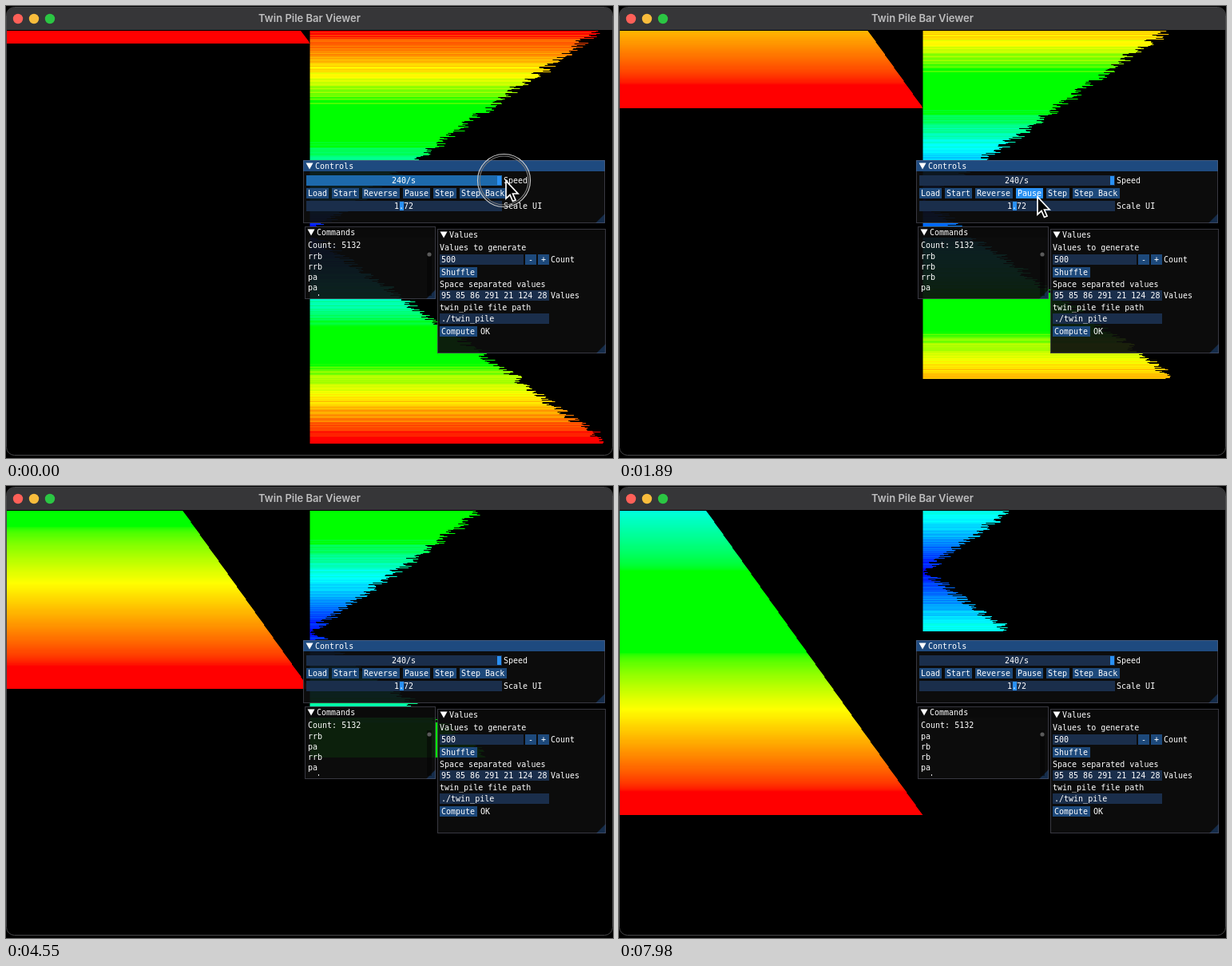
Animation, 760 px wide and 566 px high, one loop 8 s. Source, as an HTML page with a canvas:

```html
<!DOCTYPE html>
<html lang="en">
<head>
<meta charset="utf-8">
<title>Twin Pile Bar Viewer</title>
<style>
  html, body { margin: 0; width: 100%; height: 100%; overflow: hidden; background: #000; }
  canvas { display: block; }
</style>
</head>
<body>
<canvas width="760" height="566"></canvas>
<script>
const ctx = document.querySelector('canvas').getContext('2d');
const LOOP = 8000, STEP = 70;
const SIZE = 500, JITTER = 26, TOP = 30.6, ROW = 533 / SIZE, UNIT = 379 / SIZE;
const MONO = "10px 'DejaVu Sans Mono', monospace";
const FRAME = '#1a2e4b', HOVER_FRAME = '#1b4470', ACTIVE = '#1d69ab';
const BUTTON = '#1d497b', BRIGHT = '#2990f3';

// [ms, value...] keys
const sortedKeys = [[0, 15], [1190, 63], [2660, 122], [4550, 210], [5950, 273], [6860, 312], [7980, 358]];
const cursorKeys = [[0, 626, 219], [280, 626, 219], [1050, 532, 259], [1260, 532, 259],
  [1750, 524, 239], [3430, 524, 239], [4060, 560, 575]];

const clamp = v => Math.min(1, Math.max(0, v));
const smooth = u => u * u * (3 - 2 * u);
function sample(keys, t, ease = u => u) {
  const i = keys.findIndex(k => k[0] > t);
  if (i < 0) return keys[keys.length - 1].slice(1);
  const a = keys[i - 1], b = keys[i], u = ease((t - a[0]) / (b[0] - a[0]));
  return a.slice(1).map((v, j) => v + (b[j + 1] - v) * u);
}

function randomSource(seed) {
  return () => (seed = (Math.imul(seed, 1664525) + 1013904223) >>> 0) / 2 ** 32;
}

// Roughly ascending values go to both ends in turn, which makes a ragged V.
function raggedPile() {
  const random = randomSource(42), pile = [];
  Array.from({ length: SIZE }, (_, v) => ({ v, key: v + random() * JITTER }))
    .sort((a, b) => a.key - b.key)
    .forEach(({ v }, i) => i % 2 ? pile.unshift(v) : pile.push(v));
  return pile;
}

// Bring the largest value to the top, push it back, repeat.
const ops = [], piles = [], opsAtCount = [0];
(function sortBack() {
  const pile = raggedPile();
  const record = name => { ops.push(name); piles.push(Int16Array.from(pile)); };
  piles.push(Int16Array.from(pile));
  for (let max = SIZE - 1; max >= 0; max--) {
    const forward = pile.indexOf(max) <= pile.length / 2;
    while (pile[0] !== max) {
      if (forward) { pile.push(pile.shift()); record('rb'); }
      else { pile.unshift(pile.pop()); record('rrb'); }
    }
    pile.shift();
    record('pa');
    opsAtCount.push(ops.length);
  }
})();

// Even hue ramp from blue to red in a wide gamut, clipped to sRGB.
function rampColour(v) {
  const hue = 4 * (1 - v / SIZE);
  const [r, g, b] = [2 - hue, 2 - Math.abs(hue - 2), hue - 2]
    .map(c => clamp(c)).map(c => c < .04045 ? c / 12.92 : ((c + .055) / 1.055) ** 2.4);
  const out = [1.225 * r - .225 * g, 1.042 * g - .042 * r, 1.098 * b - .079 * g - .02 * r]
    .map(c => clamp(c)).map(c => c < .0031 ? c * 12.92 : 1.055 * c ** (1 / 2.4) - .055);
  return `rgb(${out.map(c => Math.round(c * 255))})`;
}
const colours = Array.from({ length: SIZE }, (_, v) => rampColour(v));

function rect(x, y, right, bottom, colour) {
  ctx.fillStyle = colour;
  ctx.fillRect(x, y, right - x, bottom - y);
}
function poly(points, fill) {
  ctx.beginPath();
  points.forEach(p => ctx.lineTo(...p));
  ctx.closePath();
  ctx.fillStyle = fill;
  ctx.fill();
}
function disc(x, y, r, fill) {
  ctx.beginPath();
  ctx.arc(x, y, r, 0, 7);
  ctx.fillStyle = fill;
  ctx.fill();
}
function text(s, x, baseline, align = 'left') {
  ctx.font = MONO;
  ctx.textAlign = align;
  ctx.fillStyle = '#fff';
  ctx.fillText(s, x, baseline);
}
function box(label, x, y, right, colour = BUTTON) {
  rect(x, y, right, y + 13, colour);
  text(label, x + 2, y + 10);
}
function slider(label, value, y, grab, colour) {
  rect(376, y, 621, y + 13, colour);
  rect(grab, y + 1, grab + 5, y + 12, BRIGHT);
  text(value, 498, y + 10, 'center');
  text(label, 623, y + 10);
}
function panel(title, x, y, right, bottom, titleColour) {
  rect(x, y, right, bottom, 'rgba(14,14,14,.92)');
  rect(x, y, right, y + 14, titleColour);
  poly([[right, bottom - 12], [right, bottom], [right - 12, bottom]], '#152c4a');
  ctx.strokeStyle = 'rgba(110,110,128,.45)';
  ctx.lineWidth = 1;
  ctx.strokeRect(x + .5, y + .5, right - x - 1, bottom - y - 1);
  poly([[x + 3.5, y + 3.5], [x + 12.5, y + 3.5], [x + 8, y + 11.5]], '#fff');
  text(title, x + 15, y + 11);
}

function bars(values, x) {
  values.forEach((v, i) => {
    const y = Math.round(TOP + i * ROW);
    rect(x, y, x + (v + 1) * UNIT, Math.round(TOP + (i + 1) * ROW), colours[v]);
  });
}

function appWindow() {
  ctx.beginPath();
  ctx.roundRect(1, 2, 758, 28, [9, 9, 0, 0]);
  ctx.fillStyle = '#363638';
  ctx.fill();
  ['#fe6058', '#f8bc3c', '#2bc643'].forEach((c, i) => disc(15 + 20 * i, 16, 6.2, c));
  ctx.font = "600 13px Inter, sans-serif";
  ctx.textAlign = 'center';
  ctx.fillStyle = '#bebebf';
  ctx.fillText('Twin Pile Bar Viewer', 380, 20);
}
function appBorder() {
  ctx.beginPath();
  ctx.roundRect(.5, 1.5, 759, 561, 10);
  ctx.strokeStyle = '#48484a';
  ctx.lineWidth = 1;
  ctx.stroke();
}

function controls(x, y, pressed) {
  const over = (left, right, top, bottom) => x >= left && x <= right && y >= top && y <= bottom;
  panel('Controls', 372, 193, 750, 272, '#1e4a7f');
  slider('Speed', '240/s', 212, 615,
    pressed ? ACTIVE : over(376, 621, 211, 226) ? HOVER_FRAME : FRAME);
  [['Load', 376, 404], ['Start', 408, 442], ['Reverse', 446, 493], ['Pause', 497, 531],
    ['Step', 535, 564], ['Step Back', 568, 627]].forEach(([label, left, right]) =>
    box(label, left, 228, right, over(left, right, 227, 242) ? BRIGHT : BUTTON));
  slider('Scale UI', '1.72', 244, 493, over(376, 621, 243, 260) ? HOVER_FRAME : FRAME);
}

function commands(done) {
  panel('Commands', 374, 276, 538, 367, '#0a0a0a');
  text('Count: 5132', 378, 303);
  rect(527, 306, 533, 363, 'rgba(4,4,4,.55)');
  disc(530, 311, 2.6, '#5a5a5a');
  ctx.save();
  ctx.beginPath();
  ctx.rect(376, 305, 150, 58);
  ctx.clip();
  ops.slice(done, done + 5).forEach((name, i) => text(name, 378, 317 + 13 * i));
  ctx.restore();
}

function valuesPanel() {
  panel('Values', 540, 279, 751, 435, '#0a0a0a');
  text('Values to generate', 543, 306);
  box('500', 543, 311, 648, FRAME);
  box('', 650, 311, 664);
  text('-', 657, 321, 'center');
  box('', 666, 311, 680);
  text('+', 673, 321, 'center');
  text('Count', 682, 321);
  box('Shuffle', 543, 327, 590);
  text('Space separated values', 543, 352);
  box('95 85 86 291 21 124 28', 543, 356, 680, FRAME);
  text('Values', 682, 366);
  text('twin_pile file path', 543, 381);
  box('./twin_pile', 543, 385, 680, FRAME);
  box('Compute', 543, 401, 590);
  text('OK', 594, 411);
}

function cursor(x, y, pressed) {
  if (pressed) {
    [[33, '#c8c8c8'], [30.5, '#777']].forEach(([r, colour]) => {
      ctx.beginPath();
      ctx.arc(623.5, 218.5, r, 0, 7);
      ctx.strokeStyle = colour;
      ctx.lineWidth = 1.2;
      ctx.stroke();
    });
  }
  ctx.save();
  ctx.translate(x, y);
  poly([[0, 0], [0, 22], [5, 17.5], [8.5, 25.5], [12, 24], [8.5, 16], [15, 16]], '#000');
  ctx.strokeStyle = '#fff';
  ctx.lineWidth = 1.7;
  ctx.stroke();
  ctx.restore();
}

function draw(t) {
  const [sorted] = sample(sortedKeys, t);
  const whole = Math.floor(sorted);
  const from = opsAtCount[whole], to = opsAtCount[whole + 1];
  const done = Math.floor(from + (to - from) * (sorted - whole));
  const [x, y] = sample(cursorKeys, t, smooth);
  const pressed = t < 210;

  rect(0, 0, 760, 566, '#000');
  appWindow();
  bars(Array.from({ length: whole }, (_, i) => SIZE - whole + i), 1);
  bars(piles[done], 380.5);
  appBorder();
  controls(x, y, pressed);
  commands(done);
  valuesPanel();
  cursor(x, y, pressed);
}

function tick() {
  draw(Math.floor(performance.now() % LOOP / STEP) * STEP);
  requestAnimationFrame(tick);
}
tick();
</script>
</body>
</html>
```
